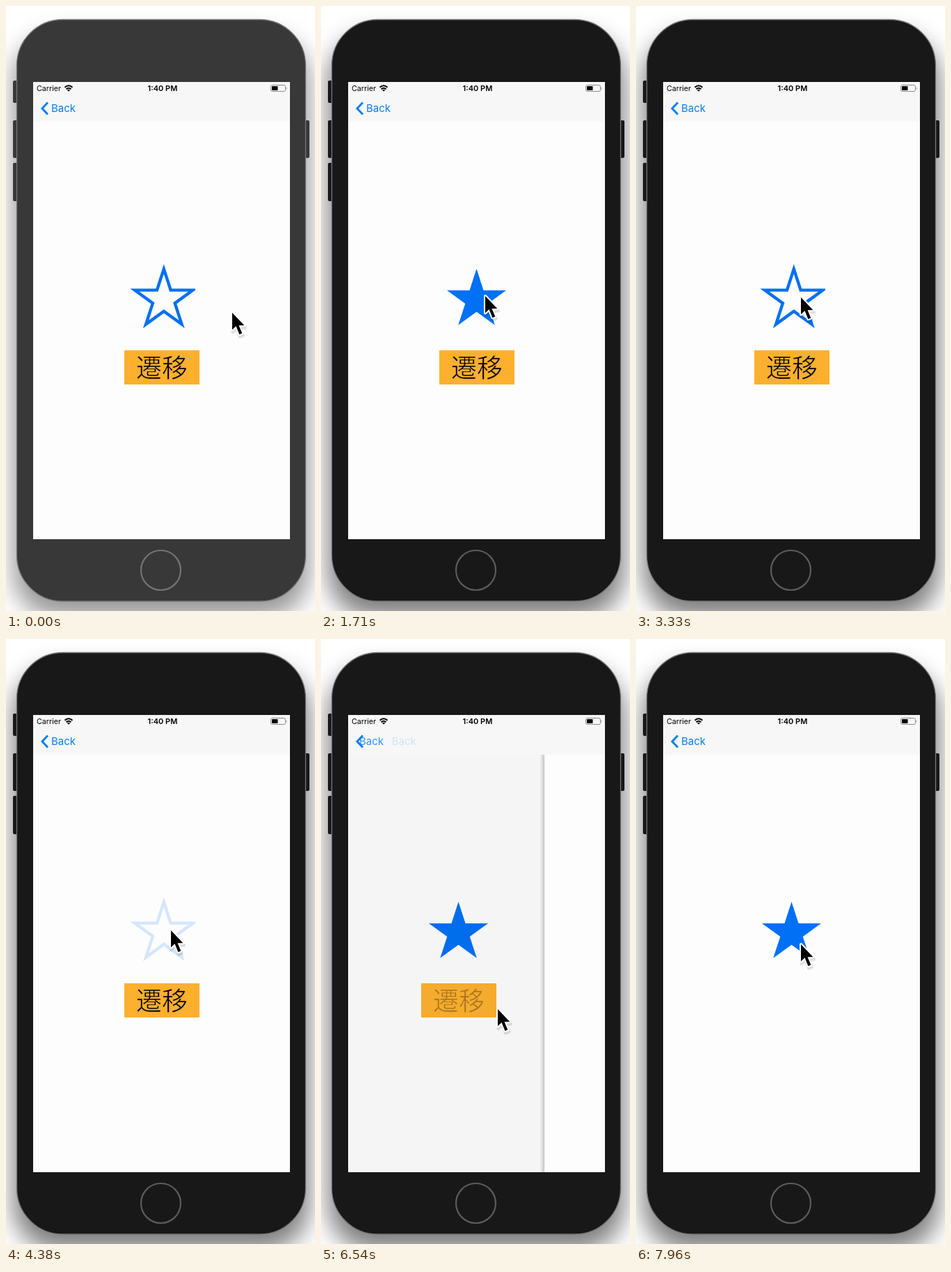
Recreate the animation shown at these times as an HTML page. Size 444x868 px, loop 8 s.

```html
<!DOCTYPE html>
<html lang="ja">
<head>
<meta charset="utf-8">
<style>
html, body { margin: 0; width: 100%; height: 100%; overflow: hidden; background: #fff; }
svg { display: block; width: 444px; height: 868px; font-family: Inter, Roboto, sans-serif; }
#shadow { filter: blur(17px); }
.kanji { font: 37px "Noto Sans CJK JP", "Noto Sans CJK", sans-serif; stroke: #fdb02e; stroke-width: .7px; }
.back { font-size: 15px; fill: #0a7ff5; }
</style>
</head>
<body>
<svg viewBox="0 0 444 868">
  <defs>
    <clipPath id="screen"><path d="M39 109H408V765H39Z"/></clipPath>
    <clipPath id="glyph"><path d="M170 360H272V470H170Z"/></clipPath>
    <linearGradient id="edge">
      <stop offset="0" stop-opacity="0"/>
      <stop offset="1" stop-opacity=".2"/>
    </linearGradient>
    <path id="solid" fill="#0070f5"/>
    <path id="arrow" d="M0 0V24.5L5.5 19.3L10.4 31.2L14.3 29.6L9.5 18.2H17.4Z"/>
  </defs>

  <rect width="444" height="868" fill="#fff"/>
  <rect id="shadow" x="10" y="42" width="426" height="836" rx="66"/>
  <g id="body">
    <path d="M12 107H18V139H12Q10 139 10 137V109Q10 107 12 107ZM12 164H18V218H12Q10 218 10 216V166Q10 164 12 164ZM12 225H18V280H12Q10 280 10 278V227Q10 225 12 225ZM428 164H434Q436 164 436 166V216Q436 218 434 218H428Z"/>
    <rect x="15.5" y="19.5" width="415" height="834.5" rx="66" stroke="#777" stroke-width="1.3"/>
  </g>
  <circle id="home" cx="222.5" cy="809.5" r="28.5" fill="none" stroke-width="2.2"/>

  <g clip-path="url(#screen)">
    <rect x="39" y="109" width="369" height="656" fill="#fdfdfd"/>
    <g id="oldPage">
      <use id="filled" href="#solid"/>
      <path id="outline" fill="none" stroke="#0070f0" stroke-width="4.4" stroke-miterlimit="5" clip-path="url(#glyph)"/>
      <rect x="170" y="494" width="108" height="49" fill="#fdb02e"/>
      <text id="label" class="kanji" x="187" y="533">遷移</text>
    </g>
    <rect id="shade" x="39" y="109" width="369" height="656"/>
    <g id="newPage">
      <rect x="32" y="109" width="7" height="656" fill="url(#edge)"/>
      <rect x="39" y="109" width="369" height="656" fill="#fdfdfd"/>
      <use href="#solid"/>
    </g>
    <rect x="39" y="109" width="369" height="57" fill="#f7f7f7"/>
    <path d="M60 138.5L52 147L60 155.5" fill="none" stroke="#0a7ff5" stroke-width="3"/>
    <text id="oldBack" class="back" y="152">Back</text>
    <text id="newBack" class="back" y="152">Back</text>
    <text x="44" y="122" font-size="10.7">Carrier</text>
    <text x="225" y="122" font-size="11" font-weight="600" text-anchor="middle">1:40 PM</text>
    <g fill="none" stroke="#000" stroke-width="2">
      <path d="M84.5 116.8Q90 111.7 95.5 116.8M86.5 119.3Q90 116.2 93.5 119.3"/>
      <path d="M90 122.8L87.8 120.5Q90 118.8 92.2 120.5Z" fill="#000" stroke="none"/>
    </g>
    <rect x="380.5" y="113.5" width="21" height="9" rx="2.3" fill="none" stroke="#8a8a8a"/>
    <rect x="382" y="115" width="8.5" height="6" rx=".8"/>
    <path d="M402.7 116.2Q404.6 118 402.7 119.8Z" fill="#8a8a8a"/>
  </g>

  <g id="cursor" stroke-linejoin="round">
    <use href="#arrow" x="1" y="3" stroke="#000" stroke-width="5" opacity=".12"/>
    <use href="#arrow" stroke="#fff" stroke-width="4" paint-order="stroke"/>
  </g>
</svg>
<script>
const LOOP = 8000, WIDTH = 369, PUSH = 6449;
const $ = id => document.getElementById(id);
const set = (id, attrs) => {
  for (const name in attrs) $(id).setAttribute(name, attrs[name]);
};
const clamp = v => Math.max(0, Math.min(1, v));
const ease = v => v * v * (3 - 2 * v);

function starPath(cx, cy, radius) {
  const points = Array.from({ length: 10 }, (_, i) => {
    const r = i % 2 ? radius * 0.382 : radius, a = i * Math.PI / 5;
    return `${cx + r * Math.sin(a)} ${cy - r * Math.cos(a)}`;
  });
  return `M${points.join("L")}Z`;
}
set("solid", { d: starPath(223.5, 421.7, 44.7) });
set("outline", { d: starPath(226.8, 421.2, 43.8) });

// Cursor stops: time, x, y
const stops = [
  [0, 325, 440], [250, 325, 440], [1050, 238, 418], [1300, 238, 418],
  [1600, 236, 416], [2900, 236, 416], [3300, 237, 418], [4650, 237, 418],
  [5500, 260, 538], [5900, 260, 538], [6300, 254, 531], [6850, 254, 531],
  [7600, 237, 438], [LOOP, 237, 438]
];
function cursorAt(t) {
  const i = stops.findIndex(s => s[0] > t);
  const [t0, x0, y0] = stops[i - 1], [t1, x1, y1] = stops[i];
  const k = ease((t - t0) / (t1 - t0));
  return [x0 + (x1 - x0) * k, y0 + (y1 - y0) * k];
}

const taps = [1650, 2980, 4450];
const isPressed = t => taps.some(tap => t >= tap - 110 && t < tap);

// Critically damped spring used by the page push
function pushAt(t) {
  const s = Math.max(0, t - PUSH) / 100;
  return s > 7 ? 1 : 1 - (1 + s) * Math.exp(-s);
}

function draw(t) {
  const dark = t >= taps[0];
  set("body", { fill: dark ? "#181818" : "#383838" });
  set("home", { stroke: dark ? "#5c5c5c" : "#747474" });
  set("shadow", { opacity: dark ? 0.5 : 0.4 });

  const isFilled = taps.filter(tap => t >= tap).length % 2 === 1;
  const starAlpha = isPressed(t) ? 0.16 : 1;
  set("filled", { opacity: isFilled ? starAlpha : 0 });
  set("outline", { opacity: isFilled ? 0 : starAlpha });

  const p = pushAt(t);
  set("label", { opacity: t > 6330 ? 0.3 : 1 });
  set("oldPage", { transform: `translate(${-0.3 * WIDTH * p})` });
  set("shade", { opacity: 0.14 * p });
  set("newPage", { transform: `translate(${WIDTH * (1 - p)})`, opacity: p > 0 ? 1 : 0 });
  set("oldBack", { x: 65 - 43 * p, opacity: clamp(1.15 - 1.4 * p) });
  set("newBack", { x: 65 + 48 * (1 - p), opacity: clamp(p * 1.1 - 0.1) });
  set("cursor", { transform: `translate(${cursorAt(t)})` });
}

function frame() {
  draw(performance.now() % LOOP);
  requestAnimationFrame(frame);
}
frame();
</script>
</body>
</html>
```
